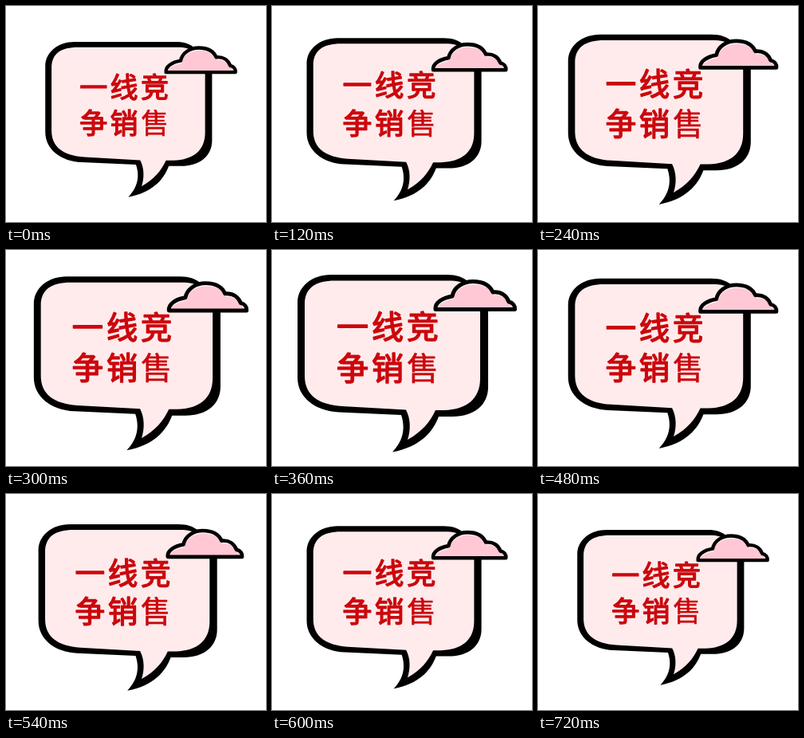
These frames come from a looping animation (326x271 px, 0.75 s). An HTML page with a canvas:

```html
<!DOCTYPE html>
<html lang="zh">
<head>
<meta charset="utf-8">
<style>
  html, body { margin: 0; width: 100%; height: 100%; overflow: hidden; background: #fff; }
  canvas { display: block; }
</style>
</head>
<body>
<canvas id="stage" width="326" height="271"></canvas>
<script>
const ctx = document.getElementById("stage").getContext("2d");
const STEP = 30, STEPS = 25, PEAK = 12;
const PIVOT = { x: 170, y: 143.5 };
const MIN_SCALE = 0.875;
const RED = "#cb080d";

const bubbleOuter = new Path2D(
  "M32 66 C32 46 50 31 74 31 L219 31 C232 31 238 34 244 38 C262 44 271 60 271 76 " +
  "L271 172 C271 194 254 209 226 209 L209 209 C202 228 186 247 151 253.5 " +
  "C161 243 169 228 162 207 L84 203.5 C54 202 32 185 32 160 Z");
const bubbleInner = new Path2D(
  "M41 68 C41 48 54 38.5 79 38.5 L225 38.5 C245 39 261 52 261 76 L261 161 " +
  "C261 187 244 200 216 201 L205 201 C198 216 188 228 170 238 " +
  "C174 226 174 212 168 200.5 L88 196 C58 194 41 182 41 158 Z");
const cloud = new Path2D(
  "M205 74.5 C204 66 214 60 226 58 C228 47 239 39.5 252 39.5 " +
  "C264 39.5 273 44 277 53 C287 52 294 57 297 65 C302 66 305 70 304.5 74.5 Z");

function fill(path, color) {
  ctx.fillStyle = color;
  ctx.fill(path);
}

function label(text, x, y, boldness) {
  ctx.font = '40px "Noto Sans CJK SC", "Noto Sans CJK", sans-serif';
  ctx.letterSpacing = "4px";
  ctx.fillStyle = ctx.strokeStyle = RED;
  ctx.lineWidth = boldness;
  ctx.fillText(text, x, y);
  ctx.strokeText(text, x, y);
}

function drawCloud() {
  ctx.save();
  ctx.clip(cloud);
  fill(cloud, "#fff0f3");
  ctx.translate(1, 4);
  fill(cloud, "#ffc8d4");
  ctx.restore();
  ctx.lineWidth = 5;
  ctx.strokeStyle = "#000";
  ctx.stroke(cloud);
}

function draw(time) {
  const step = Math.floor(time / STEP) % STEPS;
  const growth = 1 - Math.abs(step - PEAK) / PEAK;
  const scale = MIN_SCALE + (1 - MIN_SCALE) * growth;

  ctx.setTransform(1, 0, 0, 1, 0, 0);
  ctx.fillStyle = "#fff";
  ctx.fillRect(0, 0, 326, 271);
  ctx.translate(PIVOT.x, PIVOT.y);
  ctx.scale(scale, scale);
  ctx.translate(-PIVOT.x, -PIVOT.y);
  ctx.lineJoin = "round";

  fill(bubbleOuter, "#000");
  fill(bubbleInner, "#ffebec");

  label("一线竞", 81, 110.5, 1.6);
  label("争销", 81, 162.5, 1.6);
  label("售", 169, 162.5, 0.6);

  drawCloud();
}

function tick() {
  draw(performance.now());
  requestAnimationFrame(tick);
}
tick();
</script>
</body>
</html>
```
